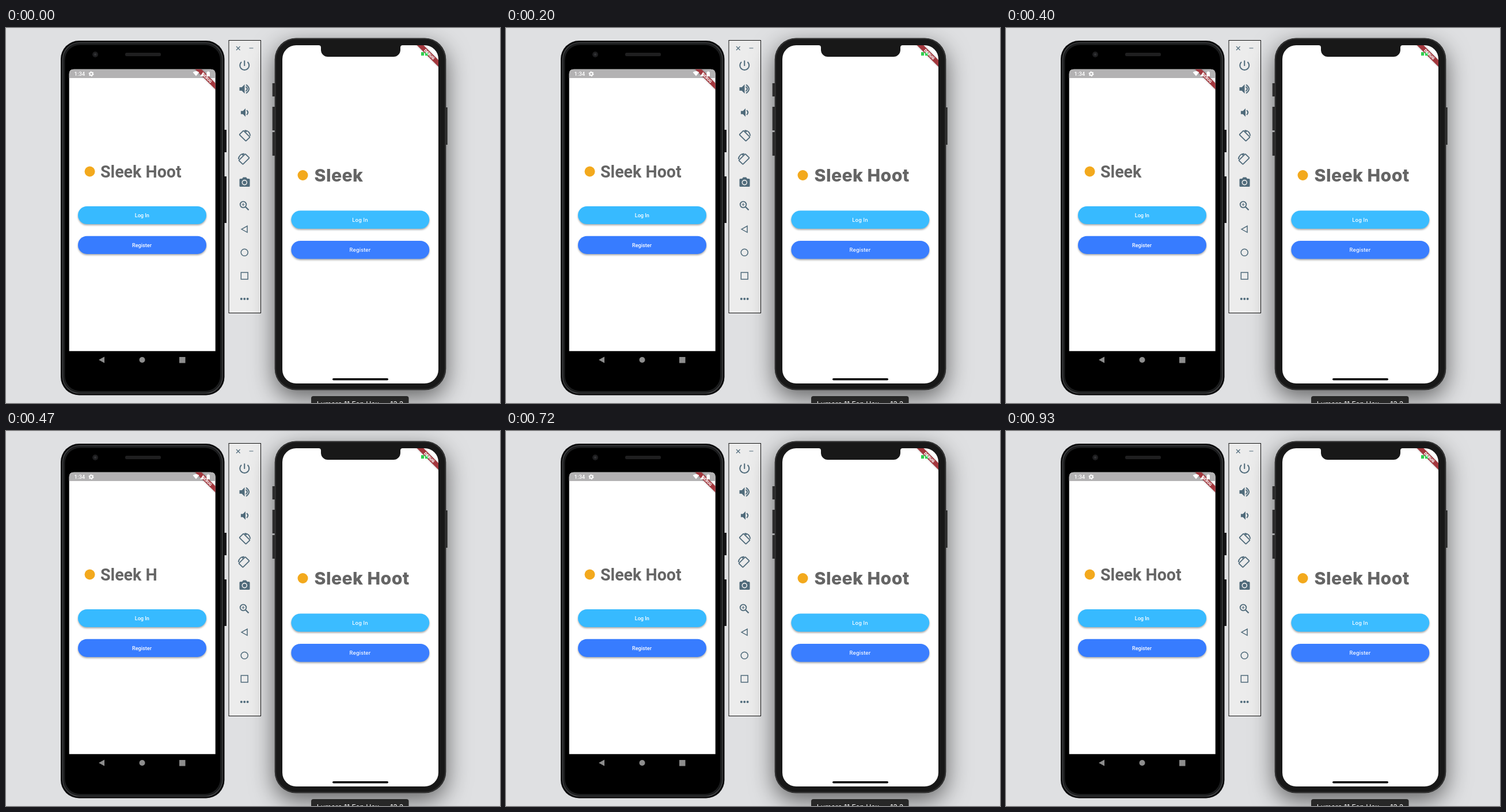
An HTML page that plays this animation: 858 px wide and 652 px high, repeating every 0.99 s.

```html
<!DOCTYPE html>
<html lang="en">
<head>
<meta charset="utf-8">
<title>Typing title on two phones</title>
<style>
  html, body { margin: 0; width: 100%; height: 100%; overflow: hidden; background: #dfe0e2; }
  svg { display: block; width: 858px; height: 652px; }
  text { fill: #fff; }
  .roboto { font-family: Roboto, sans-serif; }
  .inter { font-family: Inter, sans-serif; }
  .title { fill: #656565; }
  .android .title { font-size: 28.6px; font-weight: 700; }
  .ios .title { font-size: 30.3px; font-weight: 800; letter-spacing: .4px; }
  .label { font-size: 9.1px; font-weight: 500; text-anchor: middle; }
  .ios .label { letter-spacing: .15px; }
  .debug { font-size: 6.6px; font-weight: 900; text-anchor: middle; }
  .button { filter: drop-shadow(0 2px 1.5px rgba(0, 0, 0, .33)); }
  .login { fill: #3bbcff; }
  .register { fill: #3a7eff; }
  .android .login { fill: #37baff; }
  .android .register { fill: #377cff; }
  .ribbon { stroke: #a3373d; filter: drop-shadow(0 0 1.5px rgba(0, 0, 0, .35)); }
  .case { filter: drop-shadow(0 13px 21px rgba(0, 0, 0, .57)); }
  .line { fill: none; stroke: #506b7b; stroke-width: 1.8; }
  .solid { fill: #506b7b; }
</style>
</head>
<body>
<svg viewBox="0 0 858 652">
  <defs>
    <clipPath id="androidScreen"><path d="M109.700 561.700V79.700q0-8 8-8H355.700q8 0 8 8V561.700Z"/></clipPath>
    <clipPath id="iosScreen"><rect x="480" y="30" width="271" height="588" rx="24"/></clipPath>
    <path id="speaker" d="M-9-3h4l5-5V8l-5-5h-4Z"/>
    <g id="turn">
      <rect x="-5" y="-8" width="10" height="16" rx="1" transform="rotate(-45)"/>
      <path d="M0-9.6Q8.6-9 9.8 0M0-9.6l3.2 3"/>
    </g>
  </defs>
  <rect width="858" height="652" fill="#dfe0e2"/>

  <g class="android roboto">
    <path d="M379 177h4v39h-4ZM379 258h4v81h-4Z" fill="#1b1b1d"/>
    <rect x="95" y="22" width="284.500" height="616.500" rx="32" fill="#0b0b0c"/>
    <rect x="98.500" y="25.500" width="277.500" height="609.500" rx="29" fill="#1b1c1d" stroke="#4a4b4d" stroke-width="1.200"/>
    <rect x="102.500" y="29.500" width="269.500" height="601.500" rx="26" fill="#000"/>
    <circle cx="155" cy="46" r="5" fill="#1d1d1f"/>
    <circle cx="155" cy="46" r="2" fill="#333437"/>
    <rect x="207" y="43" width="62" height="6" rx="2.500" fill="#1f1f20"/>
    <g clip-path="url(#androidScreen)">
      <path d="M109 71h256v492H109Z" fill="#fff"/>
      <path d="M109 71h256v16H109Z" fill="#b3b2b3"/>
      <text x="118.500" y="83.300" font-size="9.500" font-weight="500">1:34</text>
      <circle cx="148" cy="79.800" r="2.600" fill="none" stroke="#fff" stroke-width="1.800"/>
      <circle cx="148" cy="79.800" r="3.900" fill="none" stroke="#fff" stroke-width="1.200" stroke-dasharray="2 2.084"/>
      <path class="ribbon" d="M324 61.700l51 51" stroke-width="7.600"/>
      <path d="M324.500 77q5.500-4 11 0L330 83.500ZM337 84l6-8v8ZM348.500 76.500h1.500v-1h2.500v1h1.500v7.500h-5.500Z" fill="#fff"/>
      <text class="debug" transform="translate(349.100 86.900) rotate(45)" y="2.300">DEBUG</text>
    </g>
    <circle cx="145.500" cy="249.500" r="9" fill="#f3a91d"/>
    <text id="androidTitle" class="title" x="164" y="260"></text>
    <rect class="button login" x="125" y="310" width="223" height="31.100" rx="15.500"/>
    <rect class="button register" x="125" y="361.800" width="223" height="31.100" rx="15.500"/>
    <text class="label" x="236.300" y="329">Log In</text>
    <text class="label" x="236" y="380.600">Register</text>
    <g fill="#8d8d8d">
      <path d="M161 577l10-5.500v11ZM301 572h10.500v10.500H301Z"/>
      <circle cx="236.500" cy="577" r="5"/>
    </g>
  </g>

  <rect x="387" y="21.500" width="55.500" height="474" fill="#ececec" stroke="#111"/>
  <g class="line">
    <path d="M400 32l6.500 6.500M406.500 32l-6.500 6.500M422.500 35h7" stroke-width="1.200"/>
    <path d="M409 59a8 8 0 1 0 10.500 0M414.200 56.500v9.500" stroke-width="2"/>
    <path d="M416.500 102q5 4 0 8M417 98.500q10 7.500 0 15" stroke-width="2"/>
    <path d="M418 143q4.500 4 0 8" stroke-width="2"/>
    <use href="#turn" x="414.500" y="187.500"/>
    <use href="#turn" transform="translate(413.500 228) scale(-1 1)"/>
    <circle cx="412" cy="307" r="5.300"/>
    <path d="M416 311l5.500 5.500" stroke-width="2.200"/>
    <path d="M409.500 307h5M412 304.500v5" stroke-width="1.200"/>
    <path d="M409 349.800l10-5.500v11Z" stroke-width="1.500"/>
    <circle cx="414.200" cy="390.300" r="6" stroke-width="1.500"/>
    <rect x="408.300" y="425" width="11.800" height="11.800" stroke-width="1.500"/>
  </g>
  <g class="solid">
    <use href="#speaker" x="414.500" y="106"/>
    <use href="#speaker" transform="translate(416 147) scale(.9)"/>
    <path d="M407 262h3l2-2.500h5l2 2.500h3q1.500 0 1.500 1.500v11q0 1.500-1.500 1.500h-15q-1.500 0-1.500-1.500v-11q0-1.500 1.500-1.500Z"/>
    <circle cx="414.300" cy="268.600" r="4" stroke="#ececec" stroke-width="1.600"/>
    <circle cx="408.800" cy="471" r="2"/>
    <circle cx="414.200" cy="471" r="2"/>
    <circle cx="419.600" cy="471" r="2"/>
  </g>

  <g class="ios inter">
    <rect class="case" x="466.700" y="17.500" width="297.600" height="612" rx="37" fill="#181818"/>
    <path d="M462.700 96h5v23h-5ZM462.700 137h5v41h-5ZM462.700 181h5v41h-5ZM763 138h3.700v65h-3.700Z" fill="#2b2b2b"/>
    <rect x="468" y="18.800" width="295" height="609.400" rx="36" fill="none" stroke="#343434" stroke-width="1.600"/>
    <g clip-path="url(#iosScreen)">
      <path d="M480 30h271v588H480Z" fill="#fff"/>
      <path class="ribbon" d="M708.500 19l54 54" stroke-width="8"/>
      <path d="M721 42h5v6h-5ZM728 42h5v6h-5Z" fill="#31d04f"/>
      <text class="debug" transform="translate(735.300 45.800) rotate(45)" y="2.400">DEBUG</text>
    </g>
    <path d="M543 29v1a4 4 0 0 1 4 4v4a12 12 0 0 0 12 12H673a12 12 0 0 0 12-12v-4a4 4 0 0 1 4-4v-1Z" fill="#181818"/>
    <circle cx="515.500" cy="256" r="9" fill="#f3a91d"/>
    <text id="iosTitle" class="title" x="535.500" y="267"></text>
    <rect class="button login" x="495.300" y="317.600" width="240" height="31.400" rx="15.700"/>
    <rect class="button register" x="495.300" y="370" width="240" height="31.400" rx="15.700"/>
    <text class="label" x="615" y="336.600">Log In</text>
    <text class="label" x="615" y="389">Register</text>
    <rect x="567" y="609" width="97" height="3.600" rx="1.800" fill="#000"/>
    <rect x="530" y="640" width="169.500" height="30" rx="4" fill="#272727"/>
    <text x="615" y="657.500" font-size="12.300" text-anchor="middle">Lumora 11 Fen Hex — 13.3</text>
  </g>
</svg>
<script>
  const LOOP = 990, STEP = 200 / 3, RATE = 2.5;
  const TITLE = "Sleek Hoot";
  const android = document.getElementById("androidTitle");
  const ios = document.getElementById("iosTitle");

  const type = (el, count) => {
    const text = TITLE.slice(0, Math.floor(count));
    if (el.textContent !== text) el.textContent = text;
  };

  function draw(now) {
    // The small offset rounds step times to 10 ms.
    const step = Math.floor((now % LOOP) / STEP + 0.06);
    type(android, step < 4 ? TITLE.length : (step - 4) * RATE);
    type(ios, 5 + step * RATE);
    requestAnimationFrame(draw);
  }
  draw(performance.now());
</script>
</body>
</html>
```
